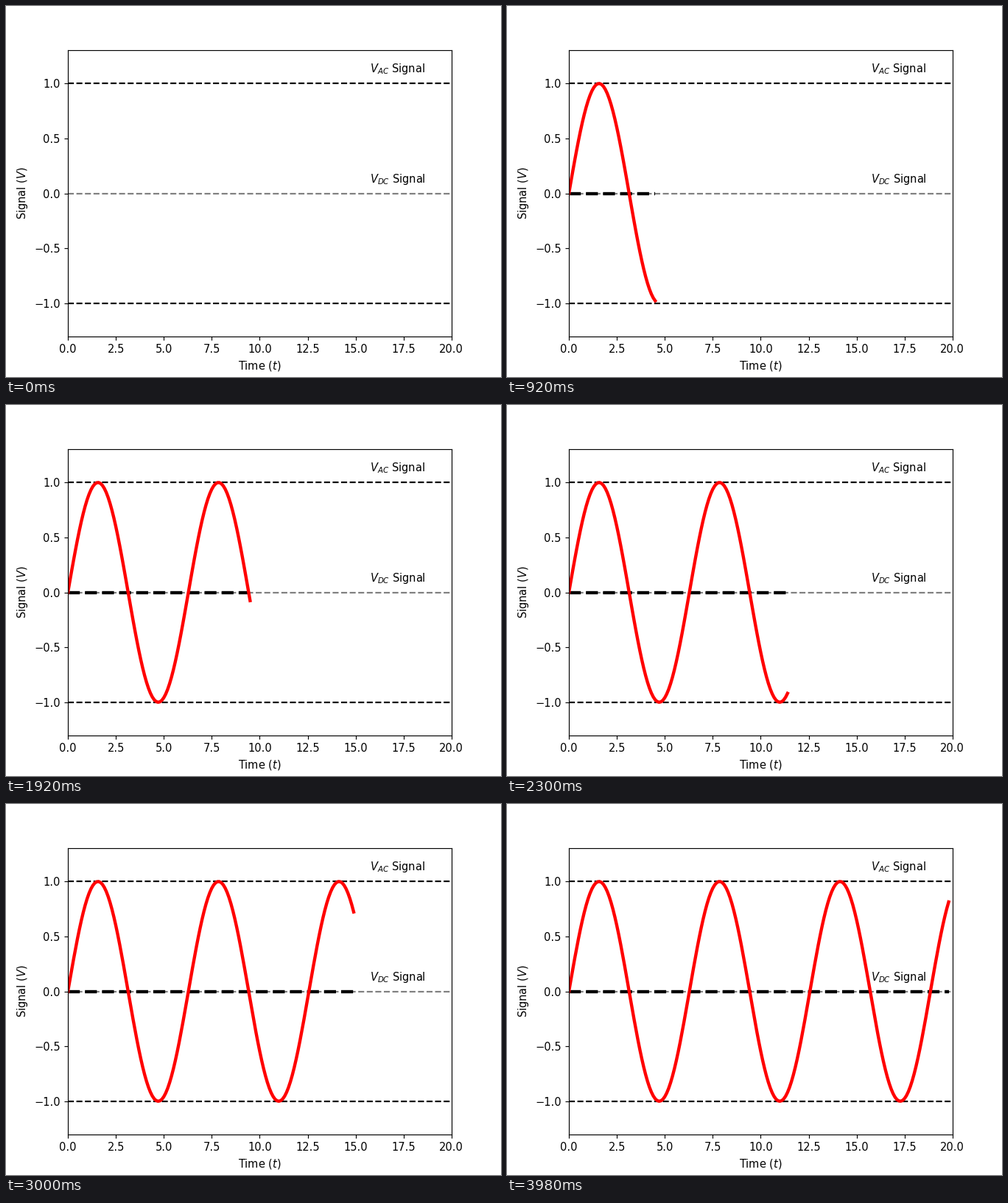
Write a matplotlib script that moves like this. It is 672x504 px and loops after 4 s.

```python
import numpy as np
import matplotlib.pyplot as plt
from matplotlib.animation import FuncAnimation

FRAMES = 200
INTERVAL = 20  # ms
T_MAX = 20

t = np.arange(0, T_MAX, T_MAX / FRAMES)
ac = np.sin(t)
dc = np.zeros_like(t)

fig, ax = plt.subplots(figsize=(6.4, 4.8), dpi=105)
ax.set_xlim(0, T_MAX)
ax.set_ylim(-1.3, 1.3)
ax.set_xlabel("Time ($t$)")
ax.set_ylabel("Signal ($V$)")

# Static reference levels
for level, color in ((1, "black"), (0, "gray"), (-1, "black")):
    ax.plot([0, T_MAX], [level, level], "--", color=color, lw=1.5)

ax.text(15.75, 1.1, "$V_{AC}$ Signal")
ax.text(15.75, 0.1, "$V_{DC}$ Signal")

dc_line, = ax.plot([], [], "--", color="black", lw=3)
ac_line, = ax.plot([], [], color="red", lw=3)


def init():
    return update(0)


def update(n):
    dc_line.set_data(t[:n], dc[:n])
    ac_line.set_data(t[:n], ac[:n])
    return dc_line, ac_line


anim = FuncAnimation(fig, update, frames=FRAMES, init_func=init,
                     interval=INTERVAL, repeat=True, repeat_delay=0)
plt.show()
```
